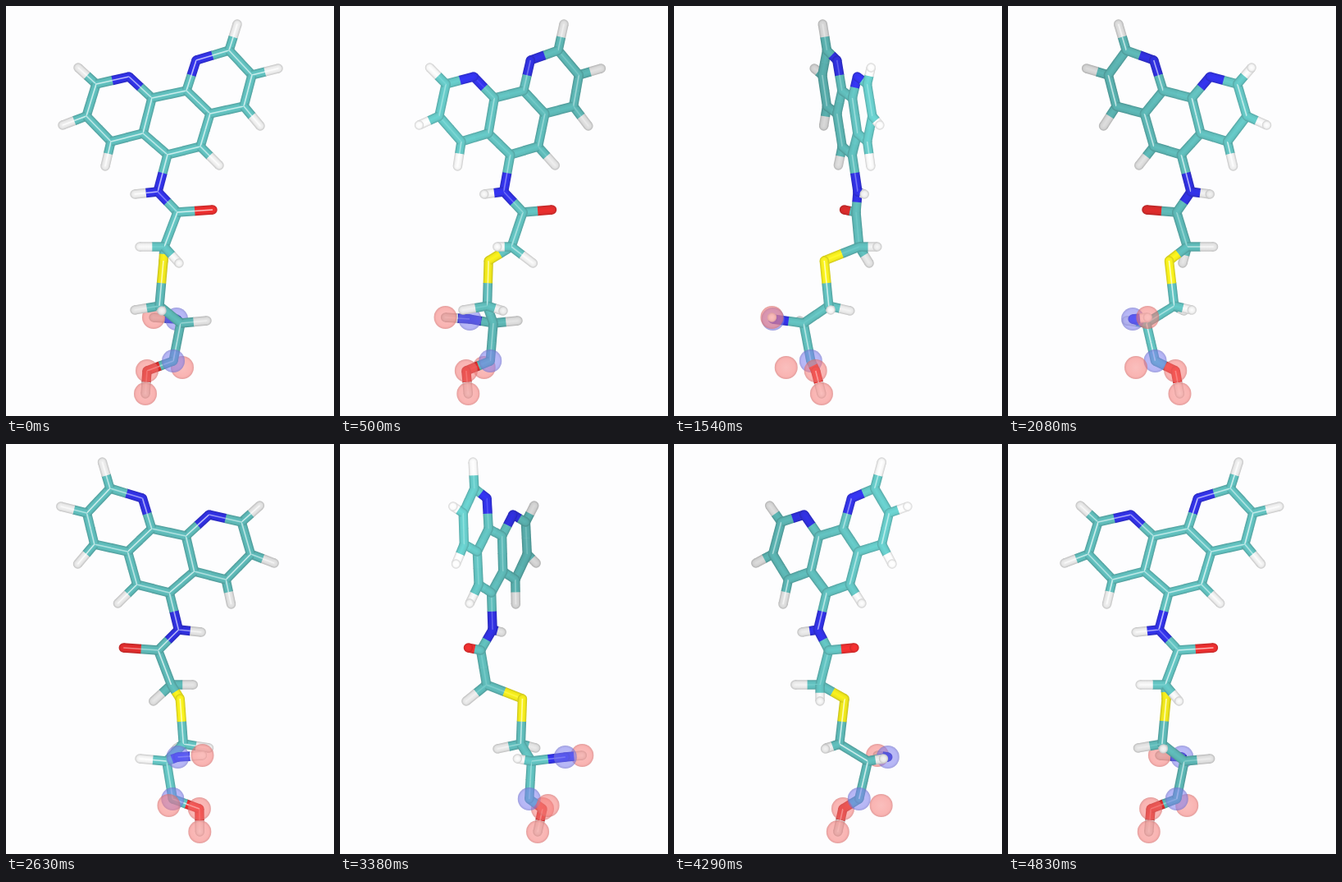
An HTML page with a canvas that plays this animation: 400 px wide and 499 px high, repeating every 4.87 s.

```html
<!DOCTYPE html>
<html lang="en">
<head>
<meta charset="utf-8">
<title>Rotating molecule</title>
<style>
  html, body { margin: 0; width: 100%; height: 100%; overflow: hidden; background: #fdfdfe; }
  canvas { display: block; width: 400px; height: 499px; }
</style>
</head>
<body>
<canvas id="stage" width="400" height="499"></canvas>
<script>
const ctx = document.getElementById('stage').getContext('2d');
const LOOP = 4870, FRAME = 1000 / 24, AXIS = 200;
const STICK = 5.7, HALO = 14;

// Base colour and bonding reach (two atoms bond when closer than their summed reach)
const ELEMENTS = {
  C: { rgb: [97, 191, 189], reach: 25 },
  N: { rgb: [50, 50, 230], reach: 25 },
  O: { rgb: [230, 46, 46], reach: 20 },
  H: { rgb: [234, 234, 234], reach: 13 },
  S: { rgb: [246, 238, 30], reach: 33 },
  free: { reach: 0 }
};
const BLUE = { fill: '125,125,238', rim: '115,115,205' };
const PINK = { fill: '246,122,118', rim: '215,112,110' };

// The flat ring system: x from the axis and y; depth follows from the plane
const rings = [
  ['N', -50, 86], ['C', -90, 95], ['C', -102, 134], ['C', -72, 165], ['C', -33, 155], ['C', -22, 112],
  ['C', -3, 181], ['C', 37, 171], ['C', 49, 131], ['C', 20, 103],
  ['N', 32, 66], ['C', 72, 54], ['C', 100, 84], ['C', 90, 122],
  ['H', -112, 75], ['H', -131, 145], ['H', -79, 195], ['H', 60, 194],
  ['H', 82, 22], ['H', 132, 76], ['H', 110, 146]
].map(([el, x, y]) => [el, x, y, 13.5 + 0.08 * x + 0.08 * (y - 130)]);

const chain = [
  ['N', -15, 226, 20], ['H', -43, 229, 18], ['C', 9, 251, 27], ['O', 52, 248, 28],
  ['C', -7, 293, 25], ['H', -37, 293, 37], ['H', 11, 313, 45], ['S', -8, 310, -21],
  ['C', -13, 365, -17], ['H', -43, 370, -26], ['H', -10, 371, 12],
  ['C', 13, 386, -40], ['H', 45, 383, -33]
];

const charged = [
  ['N', 8, 381, -82, BLUE], ['H', -20, 379, -94, PINK], ['C', 4, 432, -34, BLUE],
  ['free', 15, 440, -62, PINK], ['O', -28, 444, -40, PINK], ['H', -30, 472, -33, PINK]
];

const atoms = [...rings, ...chain, ...charged]
  .map(([el, x, y, z, halo]) => ({ x, y, z, halo, ...ELEMENTS[el] }));

const bonds = [];
atoms.forEach((a, i) => atoms.slice(i + 1).forEach(b => {
  if (Math.hypot(a.x - b.x, a.y - b.y, a.z - b.z) < a.reach + b.reach) bonds.push([a, b]);
}));

function tint(rgb, k) {
  return 'rgb(' + rgb.map(v => Math.round(Math.min(255, v * k))).join(',') + ')';
}

// Near parts are brighter, far parts darker
const depthTone = z => 1 + 0.1 * Math.max(-1, Math.min(1, z / 90));

function addShading(gradient, rgb, tone, stops) {
  for (const [at, k] of stops) gradient.addColorStop(at, tint(rgb, k * tone));
  return gradient;
}

function fillDisc(p, radius, style) {
  ctx.fillStyle = style;
  ctx.beginPath();
  ctx.arc(p.sx, p.y, radius, 0, 2 * Math.PI);
  ctx.fill();
}

function drawJoint(p) {
  const g = ctx.createRadialGradient(p.sx, p.y, 0, p.sx, p.y, STICK);
  fillDisc(p, STICK, addShading(g, p.rgb, depthTone(p.sz), [[0, 1.03], [0.6, 0.98], [1, 0.82]]));
}

function drawHalfBond(p, x, y, z) {
  const dx = x - p.sx, dy = y - p.y, flat = Math.hypot(dx, dy);
  if (flat < 0.5) return;
  const nx = -dy / flat * STICK, ny = dx / flat * STICK;
  const g = ctx.createLinearGradient(p.sx - nx, p.y - ny, p.sx + nx, p.y + ny);
  ctx.strokeStyle = addShading(g, p.rgb, depthTone((p.sz + z) / 2),
    [[0, 0.82], [0.2, 0.98], [0.5, 1.03], [0.8, 0.98], [1, 0.82]]);
  ctx.lineWidth = STICK * 2;
  ctx.beginPath();
  ctx.moveTo(p.sx, p.y);
  ctx.lineTo(x + dx / flat * 0.3, y + dy / flat * 0.3);
  ctx.stroke();

  // Sticks lying across the view catch a thin glint
  const tilt = (z - p.sz) / Math.hypot(flat, z - p.sz);
  const glint = Math.pow(1 - tilt * tilt, 16);
  if (glint < 0.05) return;
  ctx.strokeStyle = `rgba(255,255,255,${0.7 * glint})`;
  ctx.lineWidth = 1.6;
  ctx.stroke();
}

function drawHalo(p) {
  const { fill, rim } = p.halo;
  const g = ctx.createRadialGradient(p.sx, p.y, 0, p.sx, p.y, HALO);
  g.addColorStop(0, `rgba(${fill},0.48)`);
  g.addColorStop(0.8, `rgba(${fill},0.56)`);
  g.addColorStop(1, `rgba(${rim},0.68)`);
  fillDisc(p, HALO, g);
}

// Three degrees per step, with nine more gained gradually midway
function angleAt(ms) {
  const step = Math.floor((ms % LOOP + 5) / FRAME) % 117;
  const gain = 9 * Math.max(0, Math.min(1, (step - 50) / 36));
  return (3 * step + gain) * Math.PI / 180;
}

function render(ms) {
  const angle = angleAt(ms), c = Math.cos(angle), s = Math.sin(angle);
  const parts = [];
  for (const p of atoms) {
    p.sx = AXIS + p.x * c + p.z * s;
    p.sz = p.z * c - p.x * s;
    if (p.rgb) parts.push({ z: p.sz - 3, draw: () => drawJoint(p) });
    if (p.halo) parts.push({ z: p.sz + 10, draw: () => drawHalo(p) });
  }
  for (const [a, b] of bonds) {
    const x = (a.sx + b.sx) / 2, y = (a.y + b.y) / 2, z = (a.sz + b.sz) / 2;
    for (const p of [a, b]) {
      parts.push({ z: (p.sz + z) / 2, draw: () => drawHalfBond(p, x, y, z) });
    }
  }
  ctx.fillStyle = '#fdfdfe';
  ctx.fillRect(0, 0, 400, 499);
  parts.sort((a, b) => a.z - b.z).forEach(part => part.draw());
}

const start = performance.now();
function tick() {
  render(performance.now() - start);
  requestAnimationFrame(tick);
}
tick();
</script>
</body>
</html>
```
